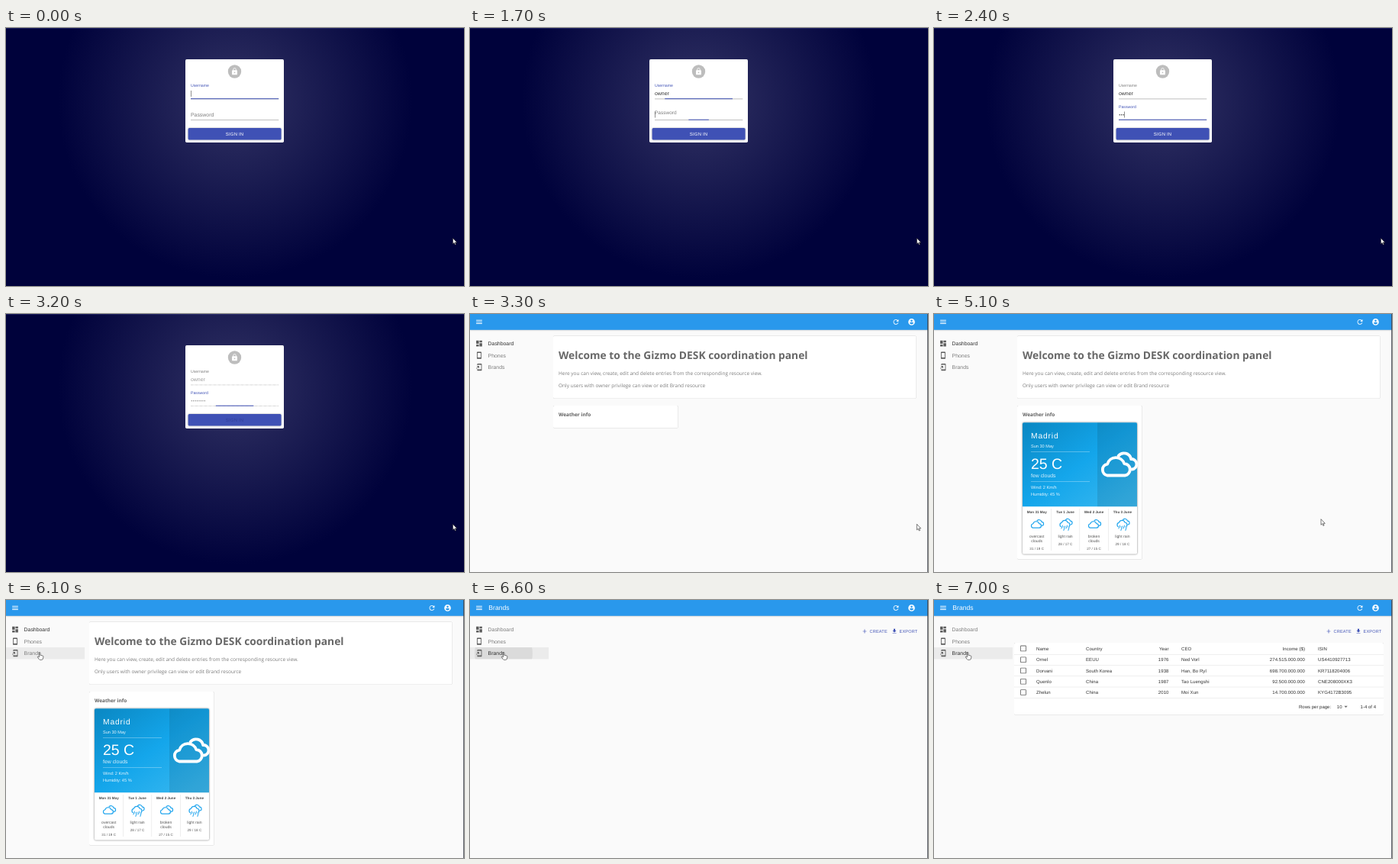
Animation, 600 px wide and 338 px high, one loop 8000 ms. Source, as an HTML page:

```html
<!DOCTYPE html>
<html lang="en">
<head>
<meta charset="utf-8">
<title>Sign in and browse</title>
<style>
  html, body { margin: 0; width: 100%; height: 100%; overflow: hidden; background: #fafafa; }
  svg { display: block; width: 600px; height: 338px; text-rendering: geometricPrecision; }
  text { font-family: "Liberation Sans", Arial, sans-serif; white-space: pre; }
  .doc { font-family: "Open Sans", "Noto Sans", sans-serif; }
  .bold { font-weight: 700; }
  .caps { letter-spacing: .17px; }
  .cell { letter-spacing: .065px; }
  .card { fill: #fff; filter: drop-shadow(0 .6px .7px rgba(0, 0, 0, .32)); }
  .bar { filter: drop-shadow(0 .8px 1px rgba(0, 0, 0, .3)); }
</style>
</head>
<body>
<svg id="stage" viewBox="0 0 600 338"></svg>
<script>
const LOOP = 8000, STEP = 100;
const USER = 'owner';
const BLUE = '#3f51b5', SKY = '#22a6ee', DARK = '#303030', GREY = '#7d7d7d';

const ICONS = {
  menu: 'M3 18h18v-2H3v2zm0-5h18v-2H3v2zm0-7v2h18V6H3z',
  refresh: 'M17.65 6.35C16.2 4.9 14.21 4 12 4c-4.42 0-7.99 3.58-7.99 8s3.57 8 7.99 8c3.73 0 6.84-2.55 7.73-6h-2.08c-.82 2.33-3.04 4-5.65 4-3.31 0-6-2.69-6-6s2.69-6 6-6c1.66 0 3.14.69 4.22 1.78L13 11h7V4z',
  account: 'M12 2a10 10 0 1 0 0 20 10 10 0 0 0 0-20zm0 3a3 3 0 1 1 0 6 3 3 0 0 1 0-6zm0 14.2c-2.5 0-4.71-1.28-6-3.22.03-1.99 4-3.08 6-3.08s5.97 1.09 6 3.08c-1.29 1.94-3.5 3.22-6 3.22z',
  board: 'M3 13h8V3H3zm0 8h8v-6H3zm10 0h8V11h-8zm0-18v6h8V3z',
  phone: 'M17 1H7a2 2 0 0 0-2 2v18a2 2 0 0 0 2 2h10a2 2 0 0 0 2-2V3a2 2 0 0 0-2-2zm0 18H7V5h10z',
  brand: 'M18 1H8a2 2 0 0 0-2 2v3h2V5h10v14H8v-1H6v3a2 2 0 0 0 2 2h10a2 2 0 0 0 2-2V3a2 2 0 0 0-2-2zM10 15h2V8H5v2h3.59L3 15.59 4.41 17 10 11.41z',
  lock: 'M18 8h-1V6A5 5 0 0 0 7 6v2H6a2 2 0 0 0-2 2v10a2 2 0 0 0 2 2h12a2 2 0 0 0 2-2V10a2 2 0 0 0-2-2zm-6 9a2 2 0 1 1 0-4 2 2 0 0 1 0 4zm3.1-9H8.9V6a3.1 3.1 0 0 1 6.2 0z',
  add: 'M19 13h-6v6h-2v-6H5v-2h6V5h2v6h6z',
  save: 'M19 9h-4V3H9v6H5l7 7zM5 18v2h14v-2z',
  box: 'M19 5v14H5V5h14m0-2H5a2 2 0 0 0-2 2v14a2 2 0 0 0 2 2h14a2 2 0 0 0 2-2V5a2 2 0 0 0-2-2z',
  drop: 'M7 10l5 5 5-5z'
};
const FRONT_CLOUD = 'M227 211.5A7.6 7.6 0 0 1 227 196.5A11.5 11.5 0 0 1 249 196A7.8 7.8 0 0 1 250 211.5Z';
const BACK_CLOUD = 'M241.5 185.7A9.5 9.5 0 0 1 258 190A6.7 6.7 0 0 1 259 203.5';

// Markup helpers
const text = (x, y, size, fill, str, extra = '') =>
  `<text x="${x}" y="${y}" font-size="${size}" fill="${fill}" ${extra}>${str}</text>`;
const rect = (x, y, w, h, fill, extra = '') =>
  `<rect x="${x}" y="${y}" width="${w}" height="${h}" fill="${fill}" ${extra}/>`;
const card = (x, y, w, h, extra = '') =>
  `<rect class="card" x="${x}" y="${y}" width="${w}" height="${h}" rx="1.7" ${extra}/>`;
const icon = (name, cx, cy, fill, size = 10.3) =>
  `<path d="${ICONS[name]}" fill="${fill}" fill-rule="evenodd" transform="translate(${cx - size / 2} ${cy - size / 2}) scale(${size / 24})"/>`;
const group = (id, ...parts) => `<g id="${id}">${parts.join('')}</g>`;
const clouds = (cx, cy, scale, color, width, both = true) =>
  `<g transform="translate(${cx} ${cy}) scale(${scale}) translate(-241.5 -198)" fill="none" stroke="${color}"
    stroke-width="${width}" stroke-linecap="round" stroke-linejoin="round">
    <path d="${FRONT_CLOUD}"/>${both ? `<path d="${BACK_CLOUD}"/>` : ''}</g>`;
const MIDDLE = 'text-anchor="middle"', END = 'text-anchor="end"';

function loginView() {
  const dots = Array.from({ length: 8 }, (_, i) =>
    `<circle class="dot" cx="${243.2 + i * 2.45}" cy="113.7" r=".72"/>`).join('');
  const line = (id, y) => `<path id="${id}" d="M242 ${y}H357.3" stroke="#949494" stroke-width=".6"/>`;
  return group('login',
    rect(0, 0, 600, 338, 'url(#night)'),
    rect(0, 0, 600, .7, '#4a4f9a', 'opacity=".5"'),
    card(235, 41, 129, 109),
    '<circle cx="299.5" cy="57" r="8.7" fill="#bdbdbd"/>',
    icon('lock', 299.5, 57, '#fff'),
    text(242, 77, 5.2, BLUE, 'Username', 'id="userLabel"'),
    text(242, 88.4, 6.9, DARK, '', 'id="userText"'),
    line('userLine', 92.9), rect(0, 92.2, 0, 1, BLUE, 'id="userFocus"'),
    text(242, 0, 6.9, GREY, 'Password', 'id="passLabel"'),
    group('dots', dots),
    line('passLine', 120.5), rect(0, 119.7, 0, 1, BLUE, 'id="passFocus"'),
    rect(242, 82, .55, 8, '#333', 'id="caret"'),
    rect(238.6, 131, 122, 15.6, BLUE, 'rx="1.7" class="bar"'),
    text(299.6, 141, 6.03, '#fff', 'SIGN IN', `id="signIn" class="caps" ${MIDDLE}`));
}

function frameView() {
  const items = [['board', 'Dashboard'], ['phone', 'Phones'], ['brand', 'Brands']];
  return group('shell',
    rect(0, 0, 600, 338, '#fafafa'),
    rect(0, 62, 103, 15.4, '#000', 'id="hover" opacity=".06"'),
    '<g clip-path="url(#item)"><circle id="ripple" cx="44" cy="70" fill="#000"/></g>',
    rect(0, 0, 600, 20.8, '#2998ec', 'class="bar"'),
    icon('menu', 12, 10.4, '#fff'), icon('refresh', 558, 10.4, '#fff'), icon('account', 578.5, 10.4, '#fff'),
    items.map(([name, label], i) =>
      icon(name, 12, 38.6 + i * 15.5, '#5c5c5c') +
      text(23.6, 41 + i * 15.5, 6.9, GREY, label, 'class="item"')).join(''));
}

function weatherView() {
  const days = [
    ['Mon 31 May', ['overcast', 'clouds'], '31 / 19 C'],
    ['Tue 1 June', ['light rain'], '28 / 17 C'],
    ['Wed 2 June', ['broken', 'clouds'], '27 / 15 C'],
    ['Thu 3 June', ['light rain'], '29 / 18 C']
  ];
  const sky = days.map(([, words], i) => {
    const cx = 135 + i * 37.5;
    if (words.length > 1) return clouds(cx, 275.3, .36, SKY, 3.3);
    const rain = [-4, -1, 2, 5].map((dx, k) => `M${cx + dx} ${277 + k % 2}l-1.6 ${k % 2 ? 5.5 : 4}`).join('');
    return clouds(cx, 274, .36, SKY, 3.3) +
      `<path d="${rain}" stroke="#fff" stroke-width="2.4"/><path d="${rain}" stroke="${SKY}" stroke-width="1" stroke-linecap="round"/>`;
  }).join('');
  const cells = days.map(([day, words, temp], i) => {
    const cx = 134.7 + i * 37.4;
    return text(cx, 261, 4.6, '#444', day, `class="bold" ${MIDDLE}`) +
      words.map((w, k) => text(cx, 293.3 + k * 5.6, 5.1, '#555', w, MIDDLE)).join('') +
      text(cx, 303.4 + (words.length - 1) * 5.4, 4.6, '#555', temp, MIDDLE) +
      (i ? rect(cx - 18.9, 255, .5, 55, '#dcdcdc') : '');
  }).join('');
  const rule = y => rect(127, y, 77, .5, '#fff', 'opacity=".6"');
  return group('weather',
    card(116, 142.3, 150, 172.2, 'style="filter:drop-shadow(0 .8px 1px rgba(0,0,0,.55))"'),
    '<path d="M116 252.3V144a1.7 1.7 0 0 1 1.7-1.7H264.3a1.7 1.7 0 0 1 1.7 1.7V252.3z" fill="url(#day)"/>',
    rect(214, 142.3, 52, 110, '#000', 'opacity=".1"'),
    text(127, 163, 10.3, '#fff', 'Madrid', 'letter-spacing=".85"'),
    text(127, 174.6, 5.6, '#e6f5fd', 'Sun 30 May'), rule(180.4),
    text(127, 203, 19.5, '#fff', '25 C'),
    text(127, 213.6, 6.9, '#d9f0fc', 'few clouds'), rule(219.3),
    text(127, 229.4, 5.6, '#e6f5fd', 'Wind: 2 Km/h'),
    text(127, 238, 5.6, '#e6f5fd', 'Humidity: 45 %'),
    cells, group('sky', clouds(241.7, 198, 1, '#fff', 3.8), sky));
}

function dashView() {
  return group('dash',
    card(109, 28.5, 475.6, 82.3),
    text(116, 59.3, 13.8, '#686868', 'Welcome to the Gizmo DESK coordination panel', 'class="doc bold"'),
    text(116, 79.6, 6.5, GREY, 'Here you can view, create, edit and delete entries from the corresponding resource view.', 'class="doc"'),
    text(116, 95.8, 6.5, GREY, `Only users with ${USER} privilege can view or edit Brand resource`, 'class="doc"'),
    card(109, 120, 163.6, 29.4, 'id="infoCard"'),
    text(116, 133.8, 6.5, '#606060', 'Weather info', 'class="doc bold"'),
    weatherView());
}

function brandsView() {
  const cols = [[134], [199], [307.5, END], [324], [486, END], [503]];
  const rows = [
    ['Name', 'Country', 'Year', 'CEO', 'Income ($)', 'ISIN'],
    ['Ornel', 'EEUU', '1976', 'Ned Vorl', '274.515.000.000', 'US4410927713'],
    ['Dorvani', 'South Korea', '1938', 'Han, Bo Ryl', '698.700.000.000', 'KR7118204006'],
    ['Quenlo', 'China', '1987', 'Tao Luengshi', '92.500.000.000', 'CNE208000XK3'],
    ['Zhelun', 'China', '2010', 'Moi Xun', '14.700.000.000', 'KYG4172B3095']
  ];
  const table = rows.map((row, i) => {
    const y = i ? 64 + i * 14.25 : 63.4;
    return icon('box', 117, y, '#666') +
      row.map((str, c) => text(cols[c][0], y + 2.2, 6.03, DARK, str, `class="cell" ${cols[c][1] || ''}`)).join('') +
      rect(105, 71 + i * 14.25, 484, .5, '#dedede');
  }).join('');
  return group('brands',
    text(24.3, 13.3, 8.6, '#fff', 'Brands'),
    icon('add', 517, 41, BLUE, 8.6), text(523.6, 43, 5.57, BLUE, 'CREATE', 'class="caps"'),
    icon('save', 556, 41, BLUE, 8.6), text(562.6, 43, 5.57, BLUE, 'EXPORT', 'class="caps"'),
    group('table', card(105, 56, 484, 94.4), table,
      text(478, 141.7, 6.03, DARK, 'Rows per page:'),
      text(527.8, 141.7, 6.03, DARK, '10'), icon('drop', 539.6, 139.6, '#666'),
      text(558.6, 141.7, 6.03, DARK, '1-4 of 4')));
}

const stage = document.getElementById('stage');
stage.innerHTML = `<defs>
  <radialGradient id="night" gradientUnits="userSpaceOnUse" cx="300" cy="96" r="232">
    <stop offset="0" stop-color="#313264"/><stop offset="1" stop-color="#00023b"/></radialGradient>
  <linearGradient id="day" x1="0" y1="0" x2="1" y2="1">
    <stop offset="0" stop-color="#0a87c2"/><stop offset=".5" stop-color="#14a6eb"/><stop offset="1" stop-color="#3dbaf0"/></linearGradient>
  <clipPath id="item"><rect y="62" width="103" height="15.4"/></clipPath></defs>` +
  loginView() + frameView() + dashView() + brandsView() +
  rect(599.2, 0, .8, 338, '#3a3f48', 'id="edge"') +
  `<g stroke="#111" stroke-width=".55" fill="#fff" stroke-linejoin="round">
    <path id="arrow" d="M0 0v7.6l1.7-1.6 1.2 2.7 1.2-.5-1.2-2.6h2.4z"/>
    <path id="hand" d="M2.2.7q.9-.8 1.4.3v3l3.1.7q1 .3.9 1.4l-.6 2.7q-.3 1.3-1.5 1.3h-2.2q-.8 0-1.3-.8l-1.9-2.8q-.2-.9.8-.8l1.3.8z"/></g>`;

const el = id => document.getElementById(id);
const set = (id, attrs) => { for (const k in attrs) el(id).setAttribute(k, attrs[k]); };
const show = (id, on) => set(id, { display: on ? 'inline' : 'none' });
const mix = (a, b, p) => a + (b - a) * p;

// Event times
const LETTERS = [700, 900, 1100, 1300, 1400];
const DOTS = [2000, 2200, 2300, 2500, 2700, 2800, 2900, 3100];
const TAB = 1700, SEND = 3200, HOME = 3300, CLICK = 6500;
const PATH = [[4800, 585.4, 275.3], [5000, 548, 273], [5700, 261, 243], [5900, 112, 118], [6000, 62, 80], [6100, 41.3, 68.3]];

const count = (times, t) => times.filter(at => t >= at).length;

// Decelerating 200 ms transition as it appears at successive steps
const settle = (t, from, steps) => t < from ? 0 : steps[Math.min(2, (t - from) / STEP)];

function pointer(t) {
  const next = PATH.findIndex(k => t < k[0]);
  if (next === 0) return PATH[0].slice(1);
  if (next < 0) return PATH[PATH.length - 1].slice(1);
  const [a, b] = [PATH[next - 1], PATH[next]], p = (t - a[0]) / (b[0] - a[0]);
  return [mix(a[1], b[1], p), mix(a[2], b[2], p)];
}

function focusLine(id, p) {
  set(id, { x: 299.6 - 57.6 * p, width: 115.2 * p });
}

function drawLogin(t) {
  const typed = count(LETTERS, t), hidden = count(DOTS, t);
  const tab = settle(t, TAB, [.23, .89, 1]), sent = settle(t, SEND, [.57, .95, 1]);
  const off = t >= SEND;
  el('userText').textContent = USER.slice(0, typed);
  set('userText', { fill: off ? '#9c9c9c' : DARK });
  set('userLabel', { fill: tab > .5 ? GREY : BLUE });
  set('passLabel', { y: mix(116, 104.9, tab), 'font-size': mix(6.9, 5.2, tab), fill: tab > .5 ? BLUE : GREY });
  set('dots', { fill: off ? '#8c8c8c' : DARK });
  document.querySelectorAll('.dot').forEach((dot, i) => dot.setAttribute('display', i < hidden ? 'inline' : 'none'));
  focusLine('userFocus', 1 - tab);
  focusLine('passFocus', tab * (1 - sent));
  for (const id of ['userLine', 'passLine']) set(id, { 'stroke-dasharray': off ? '.6 .6' : 'none' });
  set('signIn', { fill: off ? '#323f9a' : '#fff' });

  const onPass = t >= TAB;
  const width = onPass ? hidden * 2.45 : el('userText').getComputedTextLength();
  set('caret', { x: 242 + width, y: onPass ? 109.5 : 82 });
  show('caret', !off && (t < 400 || t >= 700));
}

function draw(now) {
  const t = Math.floor((now % LOOP) / STEP) * STEP;
  const home = t >= HOME, listed = t >= CLICK + STEP;
  show('login', !home);
  show('shell', home);
  show('edge', home);
  show('dash', home && !listed);
  show('brands', listed);
  show('table', t >= CLICK + 2 * STEP);
  show('weather', t >= HOME + STEP);
  show('sky', t >= HOME + 2 * STEP);
  set('infoCard', { height: t >= HOME + STEP ? 201.4 : 29.4 });
  if (!home) drawLogin(t);

  document.querySelectorAll('.item').forEach((item, i) =>
    item.setAttribute('fill', i === (listed ? 2 : 0) ? DARK : GREY));

  const over = t >= 6100, wave = (t - CLICK) / STEP;
  show('hover', over);
  show('ripple', wave >= 0 && wave < 4);
  set('ripple', { r: Math.max(0, 20 + wave * 18), opacity: Math.max(0, .09 - wave * .022) });

  const place = `translate(${pointer(t).join(' ')})`;
  show('arrow', !over);
  show('hand', over);
  set('arrow', { transform: place });
  set('hand', { transform: place });
}

function tick() {
  draw(performance.now());
  requestAnimationFrame(tick);
}
tick();
</script>
</body>
</html>
```
